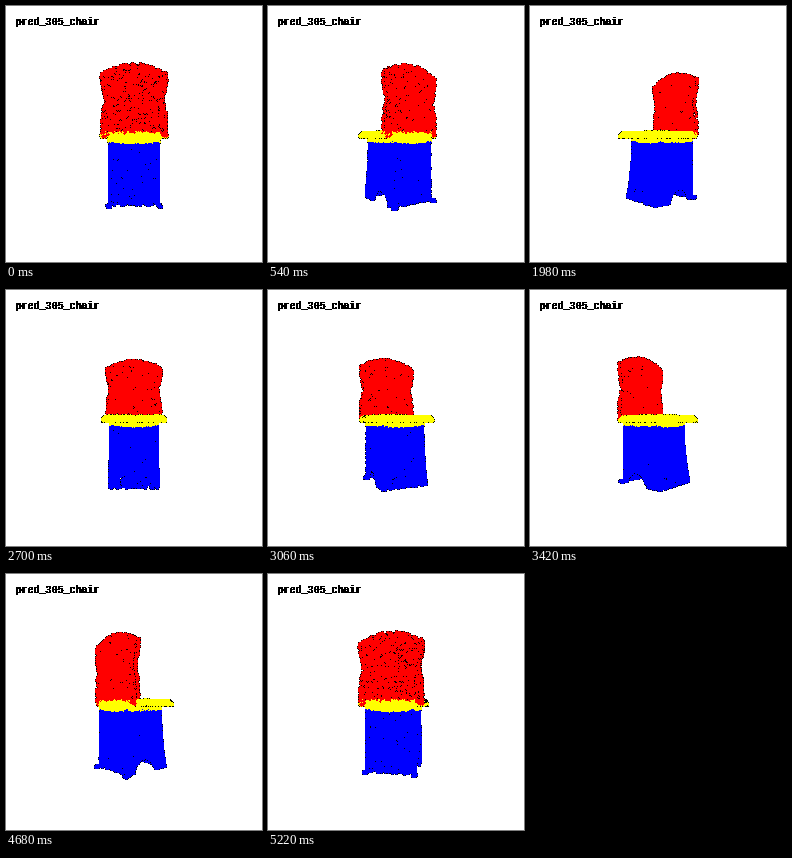
A matplotlib script that plays this animation: 256 px wide and 256 px high, repeating every 5400 ms.

```python
import numpy as np
import matplotlib.pyplot as plt
from matplotlib.animation import FuncAnimation

SIZE = 256
FRAMES = 30
INTERVAL = 180
CENTER_X, EYE_Y = 127.5, 129
CAMERA = 245
RED, YELLOW, BLUE = (255, 0, 0), (255, 255, 0), (0, 0, 255)

plt.rcParams["text.antialiased"] = False
rng = np.random.default_rng(305)
uniform = rng.uniform
points, colors = [], []


def add(x, y, z, color, keep=True):
    """Store surface points; y grows downwards, z towards the chair's back."""
    xyz = np.column_stack(np.broadcast_arrays(x, y, z))
    xyz = xyz[np.broadcast_to(keep, len(xyz))]
    points.append(xyz)
    colors.append(np.tile(color, (len(xyz), 1)))


def add_backrest(n, z, jitter):
    x, y = uniform(-31, 31, n), uniform(-65, 1.6, n)
    half = np.interp(y, [-57, -45, -33, -20, 0], [30, 29.5, 26.5, 29, 29.7])
    top = -64.5 + 9 * (x / 30) ** 2
    bottom = np.where(np.abs(x) < 23, -2, 1.6)
    keep = (np.abs(x) < half) & (y > top) & (y < bottom)
    add(x, y, z + uniform(-jitter, jitter, n), RED, keep)


def add_seat(n):
    z = -31 + 55 * uniform(0, 1, n) ** 1.4
    y = uniform(-3.2, 1.6, n)
    half = np.interp(z, [-31, -29, -22, -10, 24], [20, 25, 29, 30.5, 30])
    taper = 1 - 0.08 * np.clip(-y / 3.2, 0, 1)
    x = half * taper * np.sin(uniform(-np.pi / 2, np.pi / 2, n))
    add(x, y, z * np.where(z < 0, taper, 1), YELLOW)


def front_z(y):
    return -15 - 7 * (np.clip(y - 6, 0, 57) / 57) ** 2


def sag(x):
    return 5 + 2.5 * (1 - (x / 23) ** 2)


def add_base(n):
    # front and back panels, thinner near the floor
    for back in (False, True):
        x, y = uniform(-22.3, 22.3, n), uniform(4, 62.5, n)
        z = np.where(back, 25.5, front_z(y))
        sparse = (y > 52) & (np.abs(x) < (21 if back else 16))
        z = z + np.where(sparse, uniform(-1.5, 1.5, n), 0)
        keep = (y > sag(x)) & (~sparse | (uniform(0, 1, n) < 0.65))
        add(x, y, z, BLUE, keep)
        x, y = uniform(-22.5, 22.5, 800), uniform(-2.5, 8, 800)
        add(x, y, 25.5 if back else -15, YELLOW, y < sag(x))
    # sides with an arched opening
    for side in (-1, 1):
        y, z = uniform(5.5, 62.5, n), uniform(-22, 25.5, n)
        arch = 51 + 12 * np.abs((z - 7) / 13) ** 3
        add(side * 22.3, y, z, BLUE, (z > front_z(y)) & (y < arch))
        add(side * 22.5, uniform(0, 6.3, 500), uniform(-15, 25.5, 500), YELLOW)
        add(side * uniform(21, 24, 50), uniform(61.5, 63, 50),
            uniform(25.5, 31, 50), BLUE)


add_backrest(2600, 25.2, 0.7)
add_backrest(2700, 20.7, 0.3)
add_seat(8000)
add_base(3300)
X, Y, Z = np.concatenate(points).T
COLORS = np.concatenate(colors)

# each point is a 3 by 3 ball whose dark corners lie deeper
BALL = [(dx, dy) for dx in (-1, 0, 1) for dy in (-1, 0, 1)]
DROP = [0, 0.3, 4]


def render(angle):
    c, s = np.cos(angle), np.sin(angle)
    near = Z * c - X * s
    scale = CAMERA / (CAMERA - near)
    px = np.rint(CENTER_X + (X * c + Z * s) * scale).astype(int)
    py = np.rint(EYE_Y + Y * scale).astype(int)
    cols, rows, depth, shade = [], [], [], []
    for dx, dy in BALL:
        steps = abs(dx) + abs(dy)
        cols.append(px + dx)
        rows.append(py + dy)
        depth.append(near - DROP[steps])
        shade.append(COLORS * (steps < 2))
    order = np.argsort(np.concatenate(depth), kind="stable")
    flat = (np.concatenate(rows) * SIZE + np.concatenate(cols))[order]
    image = np.full((SIZE * SIZE, 3), 255, np.uint8)
    image[flat] = np.concatenate(shade)[order]
    return image.reshape(SIZE, SIZE, 3)


fig = plt.figure(figsize=(4, 4), dpi=64, facecolor="white")
picture = fig.figimage(render(0), origin="upper")
# struck twice for heavy stems
for left in (9.5, 10.5):
    fig.text(left / SIZE, 1 - 19 / SIZE, "pred_305_chair",
             family="Liberation Mono", weight="bold", size=10 * 72 / 64,
             color="black", va="baseline")


def update(i):
    picture.set_data(render(2 * np.pi * i / FRAMES))
    return [picture]


anim = FuncAnimation(fig, update, frames=FRAMES, interval=INTERVAL,
                     repeat=True, repeat_delay=0)
plt.show()
```
